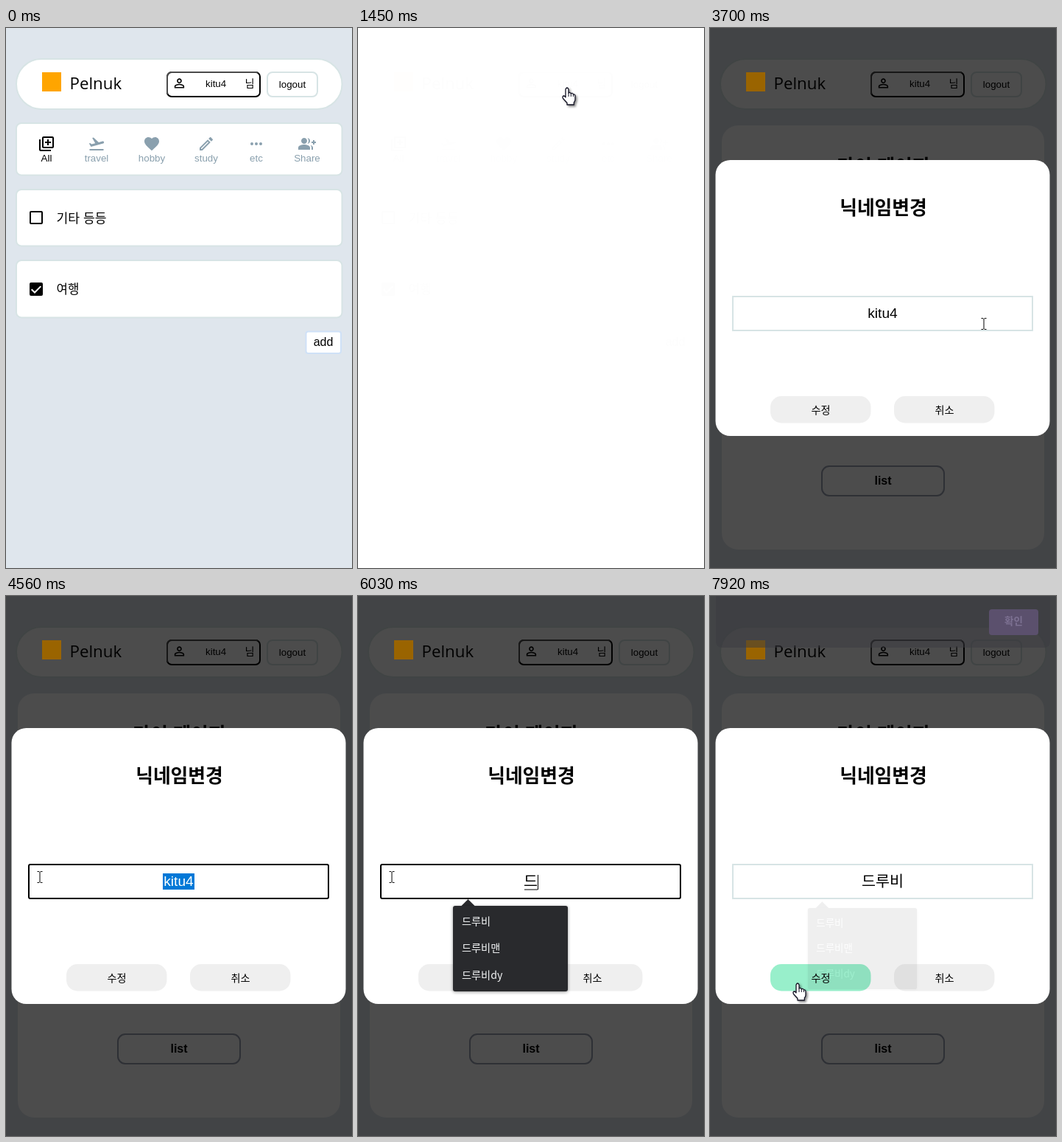
An HTML page for the animation above (8000 ms loop, 470 by 732 pixels).

```html
<!DOCTYPE html>
<html lang="ko">
<head>
<meta charset="utf-8">
<style>
html, body { margin: 0; width: 100%; height: 100%; overflow: hidden; background: #dfe6ed; }
svg { display: block; font-family: "Liberation Sans", "Noto Sans CJK KR", "Noto Sans CJK", sans-serif; }
.ko { font-family: "Noto Sans CJK KR", "Noto Sans CJK", sans-serif; }
.open { font-family: "Open Sans", sans-serif; }
.mid { text-anchor: middle; }
.bold { font-weight: 700; }
</style>
</head>
<body>
<svg id="stage" width="470" height="732" viewBox="0 0 470 732"></svg>
<script>
const LOOP = 8000, USER = 'kitu4', NICK = '드루비', LINE = '#d7e4e5', GREY = '#8aa0ae';
const stage = document.getElementById('stage');

const text = (x, y, str, size, cls = '', fill = '#000', id = '') =>
  `<text x="${x}" y="${y}" font-size="${size}" class="${cls}" fill="${fill}" id="${id}">${str}</text>`;
const rect = (x, y, w, h, r, fill, extra = '') =>
  `<rect x="${x}" y="${y}" width="${w}" height="${h}" rx="${r}" fill="${fill}" ${extra}/>`;
// Box given by its outer edges, with a 2px border inside them
const box = (x, y, x2, y2, r, line = LINE, id = '') =>
  rect(x + 1, y + 1, x2 - x - 2, y2 - y - 2, r, '#fff', `stroke="${line}" stroke-width="2" id="${id}"`);
const icon = (x, y, d, fill = '#000', scale = 1) =>
  `<path transform="translate(${x} ${y}) scale(${scale})" fill="${fill}" d="${d}"/>`;

const tabs = [
  ['All', 55, 'M4 6H2v14c0 1.1.9 2 2 2h14v-2H4V6zm16-4H8c-1.1 0-2 .9-2 2v12c0 1.1.9 2 2 2h12c1.1 0 2-.9 2-2V4c0-1.1-.9-2-2-2zm0 14H8V4h12v12zm-7-2h2v-3h3V9h-3V6h-2v3h-3v2h3z'],
  ['travel', 123, 'M2.5 19h19v2h-19zm19.57-9.36c-.21-.8-1.04-1.28-1.84-1.06L14.92 10l-6.9-6.43-1.93.51 4.14 7.17-4.97 1.33-1.97-1.54-1.45.39 2.59 4.49L21 11.49c.81-.23 1.28-1.05 1.07-1.85z'],
  ['hobby', 198, 'M12 21.35l-1.45-1.32C5.4 15.36 2 12.28 2 8.5 2 5.42 4.42 3 7.5 3c1.74 0 3.41.81 4.5 2.09C13.09 3.81 14.76 3 16.5 3 19.58 3 22 5.42 22 8.5c0 3.78-3.4 6.86-8.55 11.54z'],
  ['study', 272, 'M14.06 9.02l.92.92L5.92 19H5v-.92l9.06-9.06M17.66 3c-.25 0-.51.1-.7.29l-1.83 1.83 3.75 3.75 1.83-1.83c.39-.39.39-1.02 0-1.41l-2.34-2.34c-.2-.2-.45-.29-.71-.29zm-3.6 3.19L3 17.25V21h3.75L17.81 9.94z'],
  ['etc', 340, 'M4 12a2 2 0 1 0 4 0a2 2 0 1 0-4 0M10 12a2 2 0 1 0 4 0a2 2 0 1 0-4 0M16 12a2 2 0 1 0 4 0a2 2 0 1 0-4 0'],
  ['Share', 409, 'M22 9V7h-2v2h-2v2h2v2h2v-2h2V9zM8 12c2.21 0 4-1.79 4-4s-1.79-4-4-4-4 1.79-4 4 1.79 4 4 4zm0 1c-2.67 0-8 1.34-8 4v3h16v-3c0-2.66-5.33-4-8-4zm4.51-8.95C13.43 5.11 14 6.49 14 8s-.57 2.89-1.49 3.95C14.47 11.7 16 10.04 16 8s-1.53-3.7-3.49-3.95zm4.02 9.78C17.42 14.66 18 15.7 18 17v3h2v-3c0-1.45-1.59-2.51-3.47-3.17z']
];
const person = 'M12 5.9a2.1 2.1 0 1 1 0 4.2a2.1 2.1 0 1 1 0-4.2m0 9c2.97 0 6.1 1.46 6.1 2.1v1.1H5.9V17c0-.64 3.13-2.1 6.1-2.1M12 4C9.79 4 8 5.79 8 8s1.79 4 4 4 4-1.79 4-4-1.79-4-4-4zm0 9c-2.67 0-8 1.34-8 4v3h16v-3c0-2.66-5.33-4-8-4z';

const header = box(13, 41, 457.5, 111, 34) +
  text(86.5, 83, 'Pelnuk', 22.3, 'open') +
  box(218, 59, 346, 94, 6, '#000') +
  '<path d="M219 90V66a6 6 0 0 1 6-6h117" fill="none" stroke="#4c4c4c" stroke-width="2"/>' +
  icon(225.5, 65, person, '#000', .83) +
  text(271, 80, USER, 13.33) + text(324.5, 80, '님', 14.2, 'ko') +
  box(354, 59, 424, 94, 7) + text(389, 81, 'logout', 13.33, 'mid');

const list = box(13, 128, 457.5, 200.5, 7) +
  tabs.map(([name, x, d], i) => icon(x - 12, 145, d, i ? GREY : '#000') +
    text(x, 181, name, 13.33, 'mid', i ? GREY : '#000')).join('') +
  box(13, 218, 457.5, 296.5, 7) + box(32, 248, 50, 266, 1, '#000') +
  text(68.5, 263.5, '기타 등등', 17.2, 'ko') +
  box(13, 314, 457.5, 393.5, 7) + rect(32, 345, 18, 18, 2, '#000') +
  '<path d="M34.7 354.3l4.3 4.2 8.3-8.4" fill="none" stroke="#fff" stroke-width="2"/>' +
  text(68.5, 360, '여행', 16.8, 'ko') +
  box(406.5, 410.5, 456, 442, 3, '#cfe1f7') + text(431, 431, 'add', 16, 'mid');

const settingRow = (y, label) => box(31, y, 439, y + 53, 0) + text(50, y + 32.5, label, 17.2, 'ko') +
  rect(346, y + 12, 75, 29, 10, '#d5e3e4') + text(383.5, y + 31, 'update', 13.33, 'mid');
const myPage = rect(16, 132, 438, 575, 22, '#fff') +
  text(235.5, 197, '마이 페이지', 25.8, 'ko mid bold') +
  box(31, 236, 439, 346, 0) +
  text(120.5, 281, '1', 38, 'open bold', '#98ecd0') + text(152, 275, '예정', 17.2, 'ko bold', '#9aa1b0') +
  text(120.5, 334, '1', 38, 'open bold', '#f1625a') + text(152, 327.5, '완료', 17.2, 'ko bold', '#9aa1b0') +
  text(281, 298, 'total', 15, 'open mid bold', '#9aa1b0') +
  text(334, 311, '2', 54, 'open mid bold', '#444447') +
  settingRow(370, '닉네임 변경') + settingRow(439, '비밀번호 변경') +
  text(359.5, 525, '회원탈퇴', 17.2, 'ko') +
  box(151, 593, 319, 635, 10, '#9aa1b2') + text(235, 619, 'list', 16, 'mid bold');

const popup = '<path d="M140 420.5l9.5-9.500 9.500 9.500z" fill="#292a2d"/>' +
  rect(129, 420, 156, 116, 3, '#292a2d', 'style="filter:drop-shadow(0 1px 2px #0006)"') +
  rect(129, 420, 156, 40, 3, '#3f4042', 'id="hover"') +
  ['', '맨', 'dy'].map((end, i) => text(141, 446 + 36.3 * i, NICK + end, 14.2, 'ko', '#f1f3f4')).join('');

const modal = rect(7.5, 179, 454, 374, 20, '#fff') +
  text(235.5, 252.5, '닉네임변경', 25.8, 'ko mid bold') +
  box(30, 363, 439, 411, 0, LINE, 'field') +
  rect(213, 376, 43, 22, 0, '#0078d7', 'id="selection"') +
  text(234.5, 393, '', 19.2, 'mid', '#000', 'value') +
  '<path id="underline" d="M226 398h18" stroke="#000"/><path id="caret" d="M244.500 378v20" stroke="#000"/>' +
  rect(82, 499, 136.5, 36.5, 15, '#efefef', 'id="save"') + text(150.5, 523, '수정', 14.2, 'ko mid') +
  rect(250, 499, 136.5, 36.5, 15, '#efefef') + text(318.5, 523, '취소', 14.2, 'ko mid') +
  `<g id="popup">${popup}</g>`;

const toast = rect(8, -10, 454, 80, 8, '#3b3b40', 'opacity=".5"') + rect(379, 18, 67, 35, 4, '#5b506d') +
  text(412.500, 39, '확인', 13.500, 'ko mid bold', '#7d7192');

const cursors = `<g id="cursor" stroke-linejoin="round">
  <g id="hand" style="filter:drop-shadow(2px 2px 1.5px #0007)">
    <path d="M-2 2Q0-2 2 2V7Q4 5.500 5.300 8Q7.500 6.500 8.400 9Q11 8.500 11 11.500V16Q11 18 9.300 20V23H0V20.500L-5.500 14.500Q-7 11.500-4.500 11Q-3 11-2 13z" fill="#fff" stroke="#112" stroke-width="1.300"/>
    <path d="M2 7v5M5.300 8v4M8.400 9v3" stroke="#112"/></g>
  <path id="arrow" d="M0 0V17L4 13.300L6.500 19.300L9.300 18L6.800 12.300H12.300Z" fill="#fff" stroke="#222" style="filter:drop-shadow(1px 1px 1px #0006)"/>
  <path id="beam" d="M-3.500-7.500h2.500l1 1 1-1h2.500M0-6.500v13M-3.500 7.500h2.500l1-1 1 1h2.500" fill="none" stroke="#000"/>
</g>`;

stage.innerHTML = rect(0, 0, 470, 732, 0, '#dfe6ed') + header +
  `<g id="list">${list}</g><g id="myPage">${myPage}</g>` +
  rect(0, 0, 470, 732, 0, '#000', 'id="dim" opacity=".7"') +
  rect(49, 60, 26, 26, 0, '#ffa500', 'id="logo"') +
  `<g id="toast">${toast}</g><g id="modal">${modal}</g>` +
  rect(0, 0, 470, 732, 0, '#fff', 'id="blank"') + cursors;

const el = id => document.getElementById(id);
const show = (id, on) => el(id).setAttribute('visibility', on ? 'inherit' : 'hidden');
const set = (id, name, value) => el(id).setAttribute(name, value);
const ramp = (t, a, b) => Math.min(1, Math.max(0, (t - a) / (b - a)));

// time, tip x, tip y, shape from this time on
const path = [
  [0, 284, 17, ''], [500, 284, 17, 'arrow'], [710, 284, 56, 'hand'], [850, 284, 81, 'hand'],
  [2350, 284, 81, 'hand'], [2430, 279, 80, 'hand'], [2510, 262, 125, 'arrow'], [2620, 251, 230, 'arrow'],
  [2770, 300, 390, 'arrow'], [2880, 360, 465, 'hand'], [2950, 379, 471, 'hand'], [3150, 371, 412, 'hand'],
  [3310, 371, 412, 'hand'], [3390, 371, 400, 'hand'], [3690, 372, 401, 'hand'], [3700, 372, 401, 'beam'],
  [4010, 372, 401, ''], [4240, 240, 390, 'beam'], [4400, 51, 376, 'beam'], [4560, 46, 381, 'beam'],
  [6340, 46, 381, 'beam'], [6540, 83, 412, 'arrow'], [6740, 84, 448, 'arrow'], [6890, 135, 452, 'arrow'],
  [7050, 162, 456, 'arrow'], [7370, 162, 456, 'arrow'], [7530, 130, 502, 'hand'], [7610, 119, 525, 'hand'],
  [LOOP, 119, 525, 'hand']
];

function drawCursor(t) {
  const i = path.findIndex(key => key[0] > t);
  const [t0, x0, y0, shape] = path[i - 1], [t1, x1, y1] = path[i], k = ramp(t, t0, t1);
  set('cursor', 'transform', `translate(${x0 + (x1 - x0) * k} ${y0 + (y1 - y0) * k})`);
  for (const id of ['hand', 'arrow', 'beam']) show(id, id === shape);
}

function drawField(t) {
  const focused = t >= 4240 && t < 6890, preview = t >= 6890 && t < 7370;
  const selected = t >= 4320 && t < 5240, typing = t >= 5240 && t < 6890;
  const value = t < 5240 ? USER : t < 5320 ? '' : t < 5550 ? 'ㄷ' : t < 6890 ? '드' : NICK;
  set('field', 'stroke', focused ? '#000' : LINE);
  set('field', 'rx', focused ? 2 : 0);
  set('field', 'fill', preview ? '#e8f0fe' : '#fff');
  el('value').textContent = value;
  set('value', 'font-size', preview ? 14.2 : t < 5240 ? 19.2 : 20.7);
  set('value', 'y', preview ? 394.5 : t < 5240 ? 393 : 394);
  set('value', 'fill', selected ? '#fff' : '#000');
  show('selection', selected);
  show('underline', typing && value);
  show('caret', typing);
}

function drawPopup(t) {
  const open = ramp(t, 5700, 5950), close = ramp(t, 7370, 7610);
  const scale = .95 + .05 * open * (1 - close);
  set('popup', 'opacity', open * (1 - .93 * close));
  set('popup', 'transform', `translate(207 478) scale(${scale}) translate(-207 -478)`);
  show('hover', t >= 6890 && t < 7450);
}

function draw(t) {
  const modalOpen = t >= 3700;
  show('list', t < 1520);
  show('myPage', t >= 1520);
  show('blank', t >= 1380 && t < 1520);
  set('blank', 'opacity', t < 1450 ? .93 : .993);
  show('dim', modalOpen);
  show('modal', modalOpen);
  set('logo', 'fill', modalOpen ? '#9a6400' : '#ffa500');
  set('toast', 'opacity', ramp(t, 7760, 7920));
  set('save', 'fill', t >= 7530 ? '#98efcb' : '#efefef');
  drawField(t);
  drawPopup(t);
  drawCursor(t);
}

const start = performance.now();
function tick() {
  draw((performance.now() - start) % LOOP);
  requestAnimationFrame(tick);
}
tick();
</script>
</body>
</html>
```
